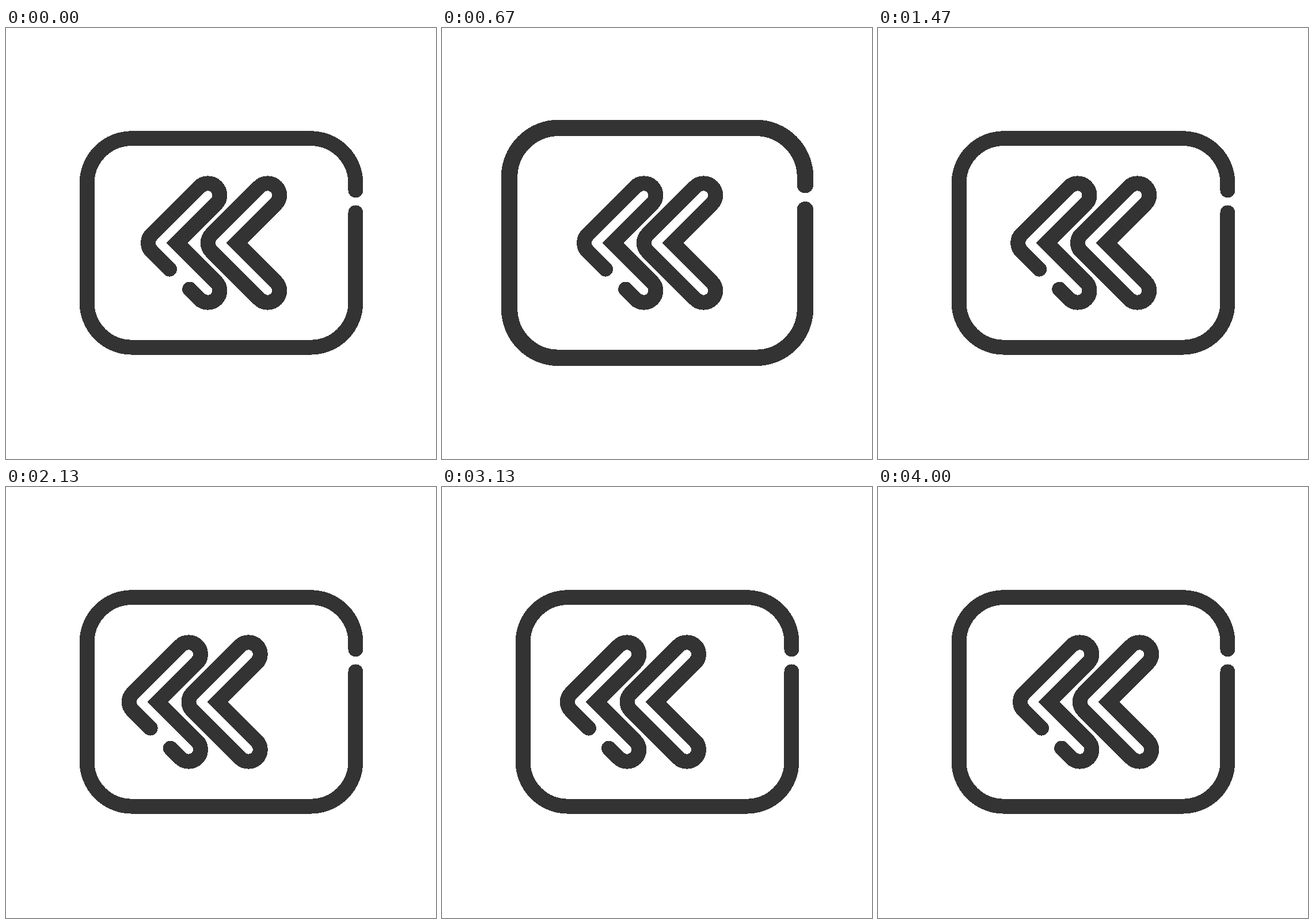
Write an HTML page that moves like this. It is 747 px wide and 750 px high and loops after 5.01 s.

```html
<!DOCTYPE html>
<html lang="en">
<head>
<meta charset="utf-8">
<title>Rewind icon</title>
<style>
  html, body { margin: 0; width: 100%; height: 100%; overflow: hidden; background: #fff; }
  svg { display: block; width: 100vw; height: 100vh; }
  path {
    fill: none;
    stroke: #333;
    stroke-width: 25.9;
    stroke-linecap: round;
    stroke-miterlimit: 10;
    shape-rendering: crispEdges;
  }
</style>
</head>
<body>
<svg viewBox="0 0 747 750">
  <path id="frame"/>
  <g id="arrows">
    <path id="openArrow"/>
    <path id="closedArrow"/>
  </g>
</svg>
<script>
const LOOP = 5010;
const HALF_CYCLE = 20; // steps, at 30 per second
const CENTER = 374;
const RADIUS = 20.7;
const ARM = 83;
const el = id => document.getElementById(id);
const smooth = p => p * p * (3 - 2 * p);

function framePath() {
  const left = 140.6, right = 607.4, top = 192.2, bottom = 555.6, r = 77.8;
  const arc = (x, y) => `a${r} ${r} 0 0 0 ${x} ${y}`;
  return `M${right} 282.4V${top + r}${arc(-r, -r)}H${left + r}${arc(-r, r)}` +
    `V${bottom - r}${arc(r, r)}H${right - r}${arc(r, -r)}V321.4`;
}

// Outline of a 45 degree chevron, optionally open on its lower left edge.
function arrowPath(tipX, gap) {
  const d = RADIUS * Math.SQRT1_2;
  const endX = tipX + ARM, top = CENTER - ARM, bottom = CENTER + ARM;
  const arc = (x, y, sweep) => `A${RADIUS} ${RADIUS} 0 0 ${sweep} ${x} ${y}`;
  const along = s => `${tipX - d + s} ${CENTER + d + s}`;
  const [from, to] = gap || [0, 0];
  return `M${along(to)}L${endX - d} ${bottom + d}` +
    arc(endX + d, bottom - d, 0) +
    `L${tipX + d * 2} ${CENTER}L${endX + d} ${top + d}` +
    arc(endX - d, top - d, 0) +
    `L${tipX - d} ${CENTER - d}` +
    arc(tipX - d, CENTER + d, 0) +
    (gap ? `L${along(from)}` : 'Z');
}

el('frame').setAttribute('d', framePath());
el('closedArrow').setAttribute('d', arrowPath(371.5));
el('openArrow').setAttribute('d', arrowPath(267.7, [31, 66]));

function stepAt(time) {
  const startOf = step => Math.round(step * 10 / 3) * 10;
  let step = Math.floor(time * 0.03) + 1;
  while (startOf(step) > time) step--;
  return step;
}

function draw(now) {
  const step = stepAt(now % LOOP);
  const cycle = Math.floor(step / (2 * HALF_CYCLE));
  const phase = step % (2 * HALF_CYCLE) / HALF_CYCLE;
  const swing = smooth(phase > 1 ? 2 - phase : phase);
  const scale = cycle === 0 ? 1 + 0.101 * swing : 1;
  const shift = cycle === 1 || cycle === 2 ? -37.2 * swing : 0;
  el('frame').setAttribute('transform',
    `translate(${CENTER} ${CENTER}) scale(${scale}) translate(${-CENTER} ${-CENTER})`);
  el('arrows').setAttribute('transform', `translate(${shift} 0)`);
}

let start;
function tick(now) {
  start ??= now;
  draw(now - start);
  requestAnimationFrame(tick);
}
draw(0);
requestAnimationFrame(tick);
</script>
</body>
</html>
```
